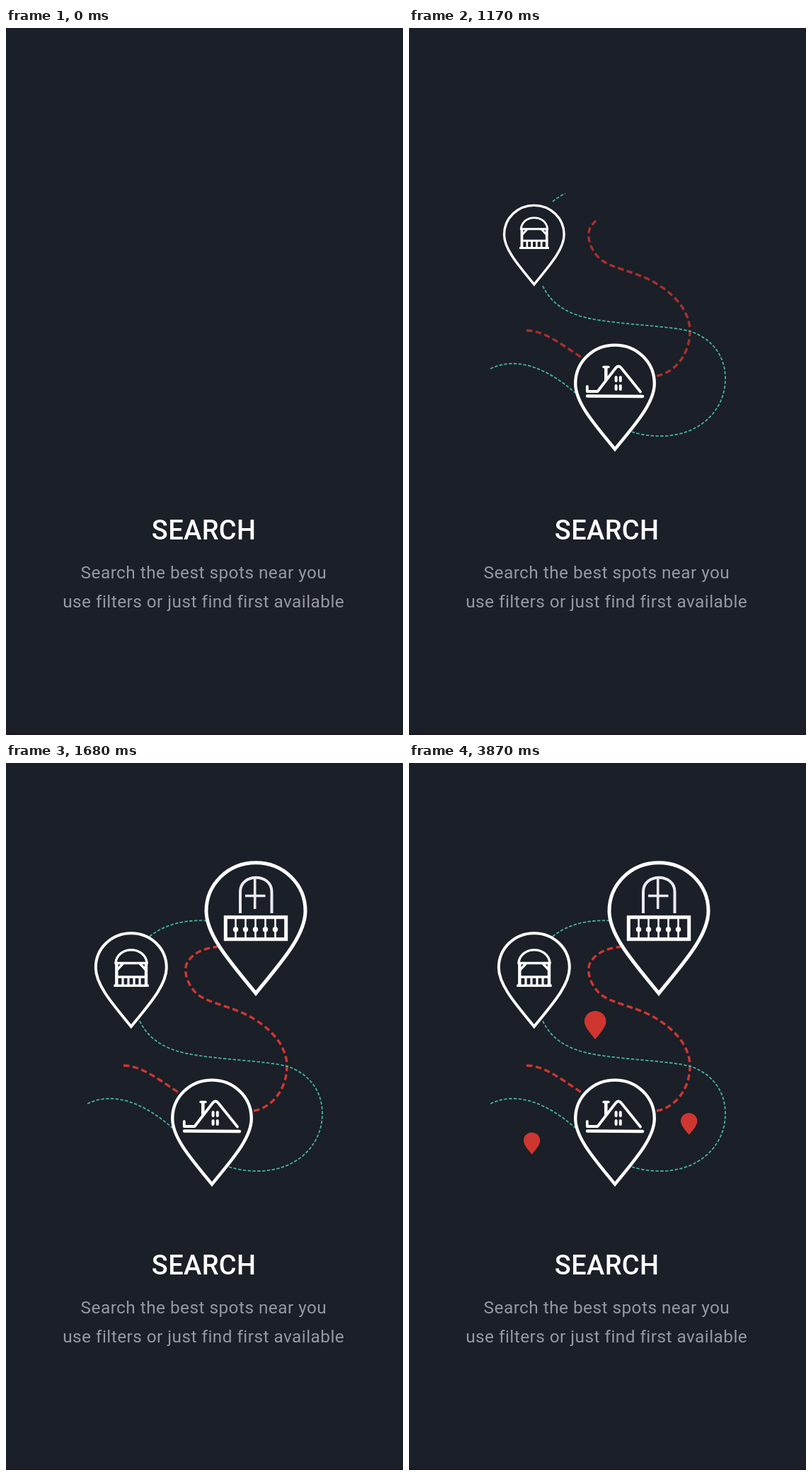
An HTML page with a canvas that plays this animation: 561 by 998 pixels, repeating every 5.4 s.

```html
<!DOCTYPE html>
<html lang="en">
<head>
<meta charset="utf-8">
<title>Search</title>
<style>
  html, body { margin: 0; width: 100%; height: 100%; overflow: hidden; background: #1a1f28; }
  canvas, svg { position: absolute; left: 0; top: 0; width: 561px; height: 998px; }
  text { font-family: Roboto, "Open Sans", sans-serif; white-space: pre; }
  .title { font-size: 38px; font-weight: 500; letter-spacing: .4px; fill: #fff; }
  .info { font-size: 24.4px; letter-spacing: .45px; fill: #96999e; }
</style>
</head>
<body>
<canvas id="stage" width="561" height="998"></canvas>
<svg viewBox="0 0 561 998">
  <text class="title" x="205.8" y="722.2">SEARCH</text>
  <text class="info" x="105.6" y="777">Search the best spots near you</text>
  <text class="info" x="80.2" y="818.4">use filters or just find first available</text>
</svg>
<script>
const LOOP = 5400, STEP = 30;
const BG = '#1a1f28', WHITE = '#fdfdfc', RED = '#d03630', TEAL = '#46b39d';
const ctx = document.getElementById('stage').getContext('2d');

const clamp = x => Math.min(1, Math.max(0, x));
const span = (t, from, to) => clamp((t - from) / (to - from));
const sine = u => (1 - Math.cos(Math.PI * u)) / 2;

// Grow past full size, then settle.
function pop(u, bend = 1) {
  return u < .7 ? 1.15 * sine(Math.pow(u / .7, bend)) : 1.15 - .15 * sine((u - .7) / .3);
}

// A route is a list of curves; each gap is the hidden stretch before the next curve.
function route(curves, gaps) {
  let at = 0;
  const parts = curves.map((d, i) => {
    const probe = document.createElementNS('http://www.w3.org/2000/svg', 'path');
    probe.setAttribute('d', d);
    const part = { path: new Path2D(d), start: at };
    at += probe.getTotalLength() + (gaps[i] || 0);
    return part;
  });
  return { parts, total: at };
}

const tealRoute = route([
  'M115 481C152 463 195 480 235 515',
  'M315 570C327 574 340 576 356 576C410 576 447 540 447 495C447 460 425 437 397 428' +
    'C365 420 300 419 255 410C222 403 200 388 189 364',
  'M203 245C222 229 250 221 283 222.5'
], [100, 125]);

const redRoute = route([
  'M166 427C190 427 212 444 245 466',
  'M350 491C378 486 397 458 397 428C397 400 375 372 335 353C310 342 285 338 270 326' +
    'C253 310 250 288 258 279C267 266 283 261 299 259.5'
], [110]);

function drawRoute(r, p, color, width, dash, gap) {
  ctx.strokeStyle = color;
  ctx.lineWidth = width;
  ctx.lineCap = 'butt';
  for (const part of r.parts) {
    const head = r.total * p - part.start;
    if (head <= 0) continue;
    const list = [];
    for (let x = 0; x < head; x += dash + gap) list.push(Math.min(dash, head - x), gap);
    list.push(0, 9999);
    ctx.setLineDash(list);
    ctx.stroke(part.path);
  }
  ctx.setLineDash([]);
}

function scaled(x, y, s, draw) {
  ctx.save();
  ctx.translate(x, y);
  ctx.scale(s, s);
  ctx.translate(-x, -y);
  draw();
  ctx.restore();
}

function pinPath(x, y, r) {
  const top = y - .975 * r, tip = y + 1.66 * r, k = .55 * r;
  ctx.beginPath();
  ctx.moveTo(x, tip);
  ctx.bezierCurveTo(x - .46 * r, y + 1.09 * r, x - r, y + .51 * r, x - r, y);
  ctx.bezierCurveTo(x - r, y - k, x - k, top, x, top);
  ctx.bezierCurveTo(x + k, top, x + r, y - k, x + r, y);
  ctx.bezierCurveTo(x + r, y + .51 * r, x + .46 * r, y + 1.09 * r, x, tip);
  ctx.closePath();
}

function line(d, width, cap = 'butt') {
  ctx.lineWidth = width;
  ctx.lineCap = cap;
  ctx.stroke(new Path2D(d));
}

function house() {
  ctx.lineJoin = 'round';
  line('M252 519.5L330 520', 4.4, 'round');
  line('M251.8 506V513H266.5L292 480Q296 475 300 480L327 513.5', 3.8, 'round');
  line('M275 478.5H282', 3.4, 'round');
  line('M278.3 479V497', 4.6);
  line('M292.6 493V498M292.6 505V510M298.8 493V498M298.8 505V510', 4, 'round');
}

function pavilion() {
  line('M154.8 283C157 257.5 197 257.5 199.2 283', 3.4);
  line('M153.5 282.5H200.5M156 302H198M152.3 314.3H201.7', 3.5);
  line('M156.3 282V314M198 282V314', 4.4);
  line('M157 292L165.5 283M197.5 292L189 283', 3.4);
  line('M165 302V314M173 302V314M181 302V314M189 302V314', 3.2);
}

function balcony() {
  ctx.strokeStyle = '#ece9f3';
  line('M331 212V182C331 155 375.5 155 375.5 182V212', 4);
  line('M351.7 162V206M338 187.5H366.5', 3.6);
  ctx.strokeStyle = ctx.fillStyle = WHITE;
  ctx.lineWidth = 5;
  ctx.strokeRect(310.3, 217.7, 85.4, 31);
  for (let x = 324.5; x < 385; x += 14) {
    line(`M${x} 218V248`, 2.6);
    ctx.beginPath();
    ctx.arc(x, 235, 3.7, 0, 7);
    ctx.fill();
  }
}

const places = [
  { x: 291, y: 502, r: 55.8, width: 4.4, start: 338, icon: house, iconY: 499 },
  { x: 176.8, y: 289, r: 50, width: 4, start: 977, icon: pavilion, iconY: 290 },
  { x: 353, y: 209, r: 70, width: 5, start: 1257, icon: balcony, iconY: 205 }
];

const markers = [
  { x: 263.2, y: 364.8, r: 15.3 },
  { x: 395.7, y: 505.4, r: 11.7 },
  { x: 173.6, y: 533, r: 11.7 }
];

function drawPlace(p, t) {
  const s = pop(span(t, p.start, p.start + 420));
  if (s <= 0) return;
  ctx.strokeStyle = WHITE;
  scaled(p.x, p.y + .35 * p.r, s, () => {
    ctx.lineJoin = 'miter';
    ctx.lineWidth = p.width;
    pinPath(p.x, p.y, p.r);
    ctx.stroke();
  });
  scaled(p.x, p.iconY, s, p.icon);
}

function drawMarkers(t) {
  const u = span(t, 2010, 3810);
  if (u <= 0) return;
  ctx.globalAlpha = u;
  ctx.fillStyle = RED;
  for (const m of markers) {
    scaled(m.x, m.y + .35 * m.r, pop(u, .85), () => {
      pinPath(m.x, m.y, m.r);
      ctx.fill();
    });
  }
  ctx.globalAlpha = 1;
}

function render(t) {
  ctx.fillStyle = BG;
  ctx.fillRect(0, 0, 561, 998);
  ctx.fillStyle = '#1b1624';
  ctx.fillRect(0, 996, 561, 2);

  const reach = sine(span(t, 30, 1400));
  ctx.globalAlpha = Math.pow(span(t, 30, 1680), .7);
  drawRoute(redRoute, reach, RED, 3.4, 8.5, 4.5);
  ctx.globalAlpha = 1;
  drawRoute(tealRoute, reach, TEAL, 1.8, 4.4, 2.4);

  for (const p of places) drawPlace(p, t);
  drawMarkers(t);
}

const begin = performance.now();
function tick() {
  const t = (performance.now() - begin) % LOOP;
  render(Math.floor(t / STEP) * STEP);
  requestAnimationFrame(tick);
}
tick();
</script>
</body>
</html>
```
